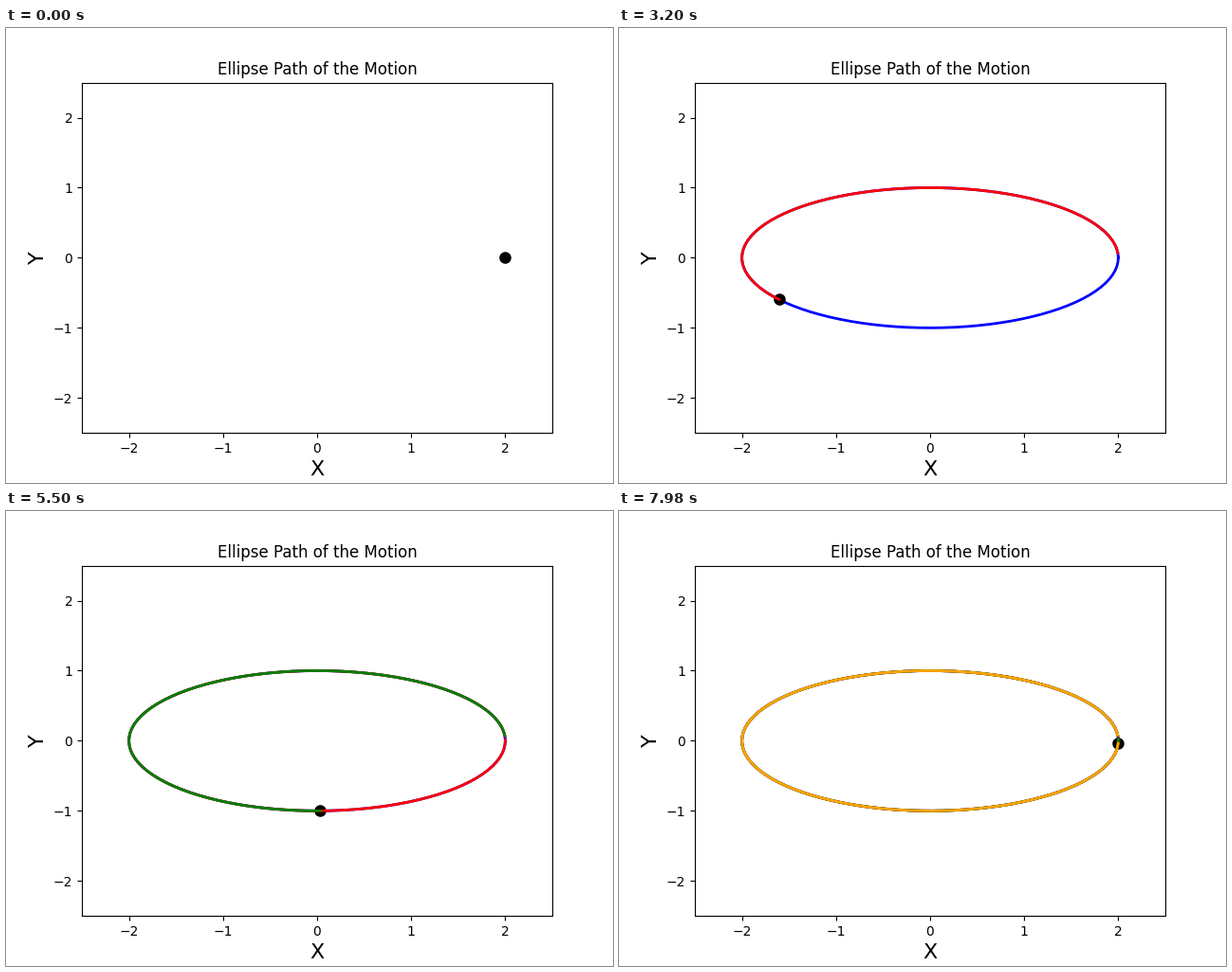
Write a matplotlib script that moves like this. It is 640x480 px and loops after 8 s.

```python
import numpy as np
import matplotlib.pyplot as plt
from matplotlib.animation import FuncAnimation

FRAMES = 400
LAP = 100
COLORS = ["blue", "red", "green", "orange"]

t = np.linspace(0, 10, 1000)
x = 2 * np.cos(2 * np.pi * t)
y = np.sin(2 * np.pi * t)

plt.rcParams["font.family"] = "DejaVu Sans"
fig, ax = plt.subplots(figsize=(6.4, 4.8), dpi=100)
ax.set(xlim=(-2.5, 2.5), ylim=(-2.5, 2.5))
ax.set_xticks(range(-2, 3))
ax.set_yticks(range(-2, 3))
ax.set_title("Ellipse Path of the Motion", fontsize=12)
ax.set_xlabel("X", fontsize=16)
ax.set_ylabel("Y", fontsize=16)


def add_trail(color):
    return ax.plot([], [], color=color, lw=2)[0]


# The dot sits above the first trail and below the later ones.
trails = [add_trail(COLORS[0])]
dot, = ax.plot([], [], "o", color="black", ms=8)
trails += [add_trail(c) for c in COLORS[1:]]


def update(i):
    for lap, trail in enumerate(trails):
        start = lap * LAP + 1 if lap else 0
        stop = min(i, (lap + 1) * LAP) + 1
        span = slice(start, max(start, stop))
        trail.set_data(x[span], y[span])
    dot.set_data([x[i]], [y[i]])
    return [*trails, dot]


anim = FuncAnimation(fig, update, frames=FRAMES, interval=20,
                     init_func=lambda: update(0), repeat=True,
                     repeat_delay=0, blit=False)
plt.show()
```
